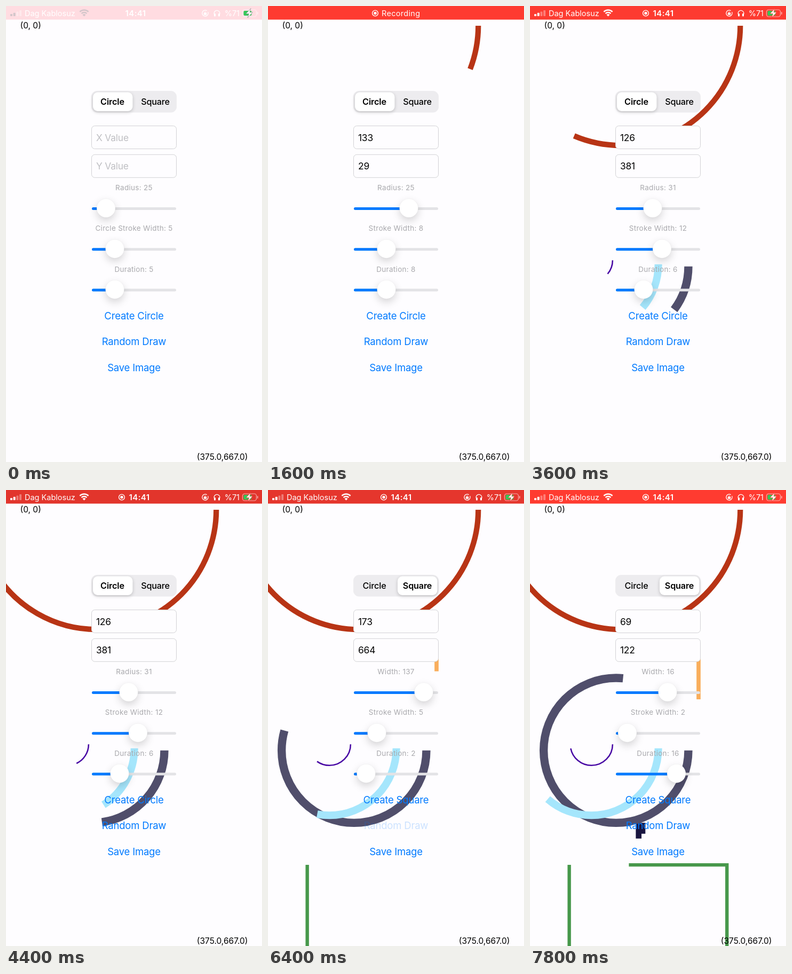
Recreate the animation shown at these times as an HTML page with a canvas. Size 480x854 px, loop 8000 ms.

```html
<!DOCTYPE html>
<html lang="en">
<head>
<meta charset="utf-8">
<title>Shape drawing demo</title>
<style>
  html, body { margin: 0; width: 100%; height: 100%; overflow: hidden; background: #fefdff; }
  canvas { display: block; width: 480px; height: 854px; }
</style>
</head>
<body>
<canvas id="stage" width="480" height="854"></canvas>
<script>
const ctx = document.getElementById('stage').getContext('2d');
const LOOP = 8000, STEP = 200, PT = 1.28;
const PAPER = '#fefdff', BLUE = '#007aff', GRAY = '#a9a9ad', INK = '#000';
const SWITCH_AT = 5000;

// Form contents after each press: time, x, y, three labels, three knob positions
const presses = [
  [0, '', '', 'Radius: 25', 'Circle Stroke Width: 5', 5, 187.5, 204, 204],
  [1138, '133', '29', 'Radius: 25', 'Stroke Width: 8', 8, 264, 222, 222],
  [1745, '90', '378', 'Radius: 175', 'Stroke Width: 11', 17, 224, 241, 283],
  [2290, '90', '372', 'Radius: 98', 'Stroke Width: 2', 12, 190, 183.5, 246.5],
  [2957, '126', '381', 'Radius: 31', 'Stroke Width: 12', 6, 230, 247.5, 213],
  [5432, '314', '304', 'Width: 106', 'Stroke Width: 6', 18, 244, 209.5, 291],
  [6024, '173', '664', 'Width: 137', 'Stroke Width: 5', 2, 292, 204, 184],
  [6480, '170', '495', 'Width: 231', 'Stroke Width: 14', 5, 184, 264, 202.5],
  [7080, '69', '122', 'Width: 16', 'Stroke Width: 2', 16, 258, 182.5, 274.5]
];

// Sizes in points; rate in degrees or pixels per second
const shapes = [
  { at: 1138, x: 133, y: 29, r: 175, w: 8, rate: 45.9, color: '#b83415' },
  { at: 1745, x: 90, y: 378, r: 98, w: 11, rate: 21.6, color: '#a5e6fc' },
  { at: 2290, x: 90, y: 372, r: 31, w: 2, rate: 30.6, color: '#4808a4' },
  { at: 2957, x: 126, y: 381, r: 106, w: 12, rate: 56.9, color: '#504e6b' },
  { at: 5432, x: 314, y: 304, side: 134.2, w: 6, rate: 37.5, color: '#f9ae5c' },
  { at: 6024, x: 173, y: 664, side: 231, w: 5, rate: 603, color: '#47984b' },
  { at: 6480, x: 170, y: 495, side: 16, w: 14, rate: 16.8, color: '#19153f' }
];

const clamp = v => Math.max(0, Math.min(1, v));

function text(str, x, y, size, o = {}) {
  ctx.font = `${o.weight || 400} ${size}px Inter, "Open Sans", sans-serif`;
  ctx.letterSpacing = (o.gap || 0) + 'px';
  ctx.textAlign = o.align || 'center';
  ctx.fillStyle = o.color || INK;
  ctx.fillText(str, x, y + size * 0.364);
}

function box(x, y, w, h, r, fill, stroke, width = 1) {
  ctx.beginPath();
  ctx.roundRect(x, y, w, h, r);
  if (fill) { ctx.fillStyle = fill; ctx.fill(); }
  if (stroke) { ctx.strokeStyle = stroke; ctx.lineWidth = width; ctx.stroke(); }
}

function disc(x, y, r, fill) {
  ctx.beginPath();
  ctx.arc(x, y, r, 0, 7);
  ctx.fillStyle = fill;
  ctx.fill();
}

function arc(x, y, r, from, to, width, color) {
  ctx.beginPath();
  ctx.arc(x, y, r, from, to);
  ctx.lineWidth = width;
  ctx.strokeStyle = color;
  ctx.stroke();
}

function poly(points, color) {
  ctx.beginPath();
  points.forEach(([x, y]) => ctx.lineTo(x, y));
  ctx.closePath();
  ctx.fillStyle = color;
  ctx.fill();
}

function shadow(color, blur, dy) {
  ctx.shadowColor = color;
  ctx.shadowBlur = blur;
  ctx.shadowOffsetY = dy;
}

function drawShape(s, t) {
  if (t < s.at) return;
  const done = s.rate * (t - s.at) / 1000;
  const x = s.x * PT, y = s.y * PT;
  if (s.r) {
    arc(x, y, s.r * PT, 0, Math.min(done, 360) * Math.PI / 180, s.w * PT, s.color);
    return;
  }
  const h = s.side * PT / 2;
  ctx.save();
  ctx.beginPath();
  ctx.moveTo(x - h, y - h);
  ctx.lineTo(x - h, y + h);
  ctx.lineTo(x + h, y + h);
  ctx.lineTo(x + h, y - h);
  ctx.closePath();
  if (done < h * 8) ctx.setLineDash([done, h * 8]);
  ctx.lineWidth = s.w * PT;
  ctx.strokeStyle = s.color;
  ctx.stroke();
  ctx.restore();
}

function drawSegments(t) {
  const k = clamp((t - SWITCH_AT) / 250);
  const slide = k * k * (3 - 2 * k);
  box(160, 159, 160, 40.5, 11, 'rgba(118,118,128,.125)');
  ctx.save();
  shadow('rgba(0,0,0,.2)', 6, 2);
  box(163 + 80 * slide, 161.5, 74.5, 35.5, 9, '#fff');
  ctx.restore();
  text('Circle', 199.5, 179.5, 16.2, { weight: k < 0.5 ? 600 : 500, gap: -0.1 });
  text('Square', 280, 179.5, 16.2, { weight: k < 0.5 ? 500 : 600, gap: -0.2 });
}

function drawField(y, value, hint) {
  box(160.5, y, 159, 43, 6, PAPER, '#d2d2d5');
  text(value || hint, 169, y + 21.7, 17.4,
    { align: 'left', color: value ? INK : '#bfbfc3', gap: -0.2 });
}

function drawSlider(y, label, knob) {
  text(label, 240, y - 39.3, 13.5, { color: GRAY, gap: 0.3 });
  box(161, y - 2.5, 158, 5, 2.5, '#e3e3e6');
  box(161, y - 2.5, knob - 161, 5, 2.5, BLUE);
  ctx.save();
  shadow('rgba(0,0,0,.17)', 15, 6);
  disc(knob, y - 1, 17.5, '#fff');
  ctx.restore();
  arc(knob, y - 1, 17.5, 0, 7, 0.6, 'rgba(0,0,0,.06)');
}

// The button dims under the finger and fades back after release
function pressAlpha(t) {
  let a = 1;
  for (const [at] of presses.slice(1)) {
    if (t >= at - 110 && t < at) a = 0.2;
    else if (t >= at && t < at + 300) a = 0.2 + 0.8 * (t - at) / 300;
  }
  return a;
}

function drawRecordIcon(x) {
  arc(x, 13.5, 5.4, 0, 7, 1.4, '#fff');
  disc(x, 13.5, 2.7, '#fff');
}

function drawBattery(bar) {
  box(443.5, 7, 26, 13, 4, null, 'rgba(255,255,255,.6)', 1.2);
  box(445.5, 9, 15, 9, 2, '#34c759');
  box(471, 11, 1.6, 5, 1, 'rgba(255,255,255,.6)');
  const bolt = [[459, 4.5], [450, 14.5], [455.5, 14.5], [453, 22], [462.5, 11.8], [457, 11.8]];
  poly(bolt, '#fff');
  ctx.strokeStyle = bar;
  ctx.lineWidth = 0.8;
  ctx.stroke();
}

function drawStatus(bar, recording, tint) {
  for (let i = 0; i < 4; i++) {
    const h = 4 + i * 2.3;
    box(8 + i * 5.7, 19 - h, 4, h, 1, i < 2 ? tint : 'rgba(255,255,255,.35)');
  }
  text('Dag Kablosuz', 35, 13.5, 14.5, { align: 'left', color: '#fff' });

  const up = -Math.PI / 2;
  for (const r of [7, 11.5]) arc(146.5, 19, r, up - 0.78, up + 0.78, 2.5, tint);
  poly([[146.5, 19.5], [143.4, 16.2], [146.5, 14.8], [149.6, 16.2]], tint);

  if (recording) drawRecordIcon(217);
  text('14:41', recording ? 250 : 243, 13.5, 15, { weight: 600, color: '#fff', gap: 0.4 });

  arc(373.5, 13.5, 5.6, -0.4, 5.3, 1.3, '#fff');
  box(370.8, 12.8, 5.4, 4, 0.8, '#fff');
  arc(373.5, 12.8, 1.7, Math.PI, 0, 1, '#fff');

  arc(395.5, 13.8, 5.4, Math.PI * 0.9, Math.PI * 2.1, 1.3, '#fff');
  box(390, 14, 3, 5.5, 1.2, '#fff');
  box(398, 14, 3, 5.5, 1.2, '#fff');

  text('%71', 438, 13.5, 14.5, { align: 'right', color: '#fff' });
  drawBattery(bar);
}

function drawStatusBar(t) {
  const pulse = t < 1000 ? 1 : 0.5 + 0.5 * Math.cos((t - 1700) / 2050 * 2 * Math.PI);
  const mix = (a, b) => Math.round(a + (b - a) * pulse);
  const bar = `rgb(${mix(214, 255)},${mix(51, 59)},${mix(43, 48)})`;
  if (t < STEP) {
    box(0, 0, 480, 25.5, 0, '#ffdce1');
    drawStatus('#999', false, '#d3c6ca');
    return;
  }
  box(0, 0, 480, 25.5, 0, bar);
  const swap = clamp((t - 3300) / 300);
  ctx.globalAlpha = 1 - swap;
  drawRecordIcon(201);
  text('Recording', 213, 13.5, 14.5, { align: 'left', color: '#fff', gap: 0.3 });
  ctx.globalAlpha = swap;
  if (swap) drawStatus(bar, true, '#fff');
  ctx.globalAlpha = 1;
}

function draw(t) {
  ctx.fillStyle = PAPER;
  ctx.fillRect(0, 0, 480, 854);

  // Newer shapes lie beneath older ones
  [...shapes].reverse().forEach(s => drawShape(s, t));

  const [at, x, y, size, stroke, duration, ...knobs] = presses.filter(p => t >= p[0]).pop();
  const square = t >= SWITCH_AT;
  drawSegments(t);
  drawField(224.5, x, 'X Value');
  drawField(278.3, y, 'Y Value');
  drawSlider(379.5, square && at < SWITCH_AT ? 'Width: 106' : size, knobs[0]);
  drawSlider(455.7, stroke, knobs[1]);
  drawSlider(531.9, 'Duration: ' + duration, knobs[2]);

  const link = { color: BLUE, gap: -0.2 };
  text(square ? 'Create Square' : 'Create Circle', 240, 580, 18.5, link);
  ctx.globalAlpha = pressAlpha(t);
  text('Random Draw', 240, 628.7, 18.5, link);
  ctx.globalAlpha = 1;
  text('Save Image', 240, 677.3, 18.5, link);

  text('(0, 0)', 26.5, 36, 15.5, { align: 'left' });
  text('(375.0,667.0)', 453.5, 844, 15.5, { align: 'right' });
  drawStatusBar(t);
}

const start = performance.now();
function tick() {
  const t = (performance.now() - start) % LOOP;
  draw(Math.floor(t / STEP) * STEP);
  requestAnimationFrame(tick);
}
tick();
</script>
</body>
</html>
```
